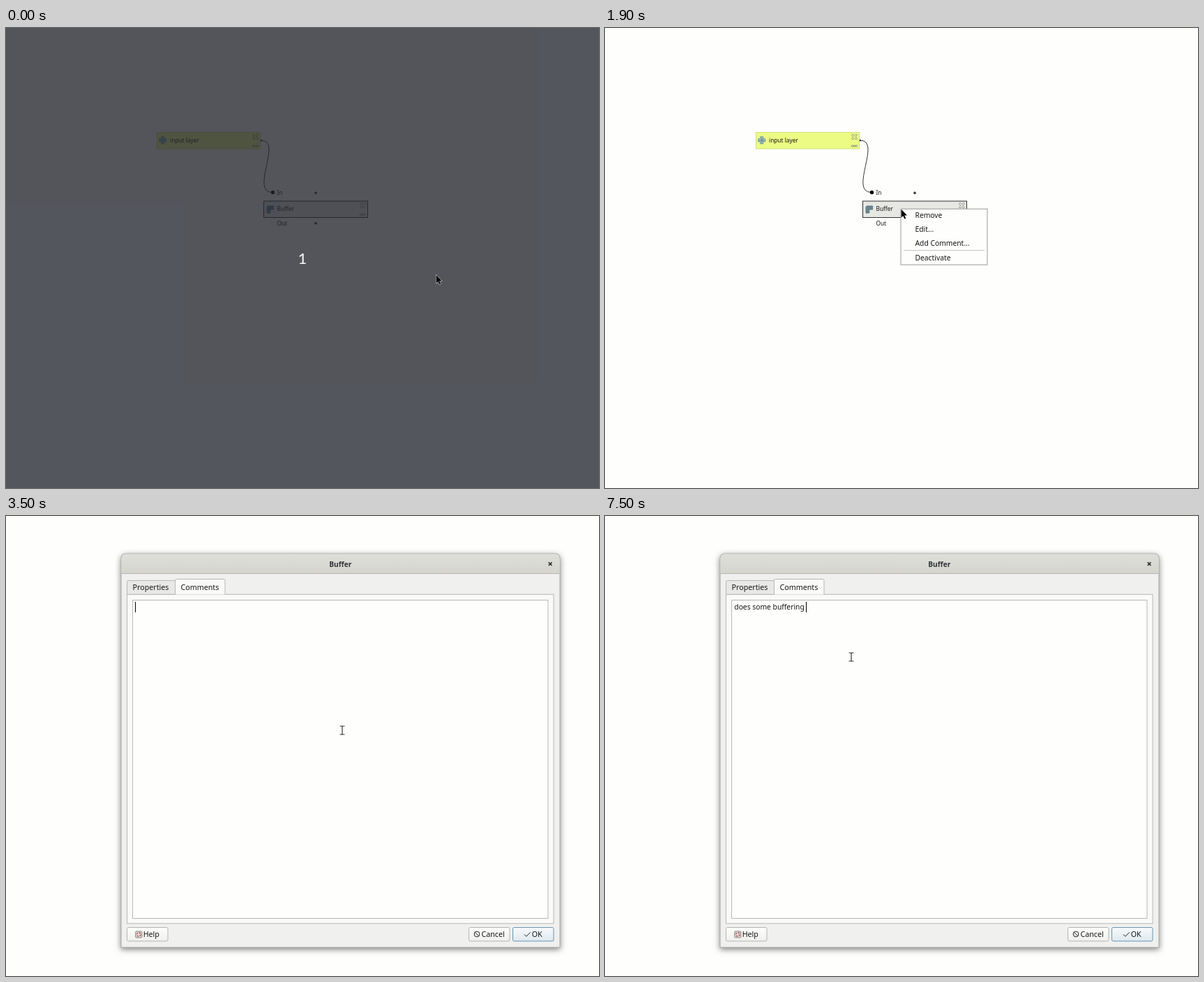
Recreate the animation shown at these times as an HTML page. Size 850x659 px, loop 8 s.

```html
<!DOCTYPE html>
<html lang="en">
<head>
<meta charset="utf-8">
<title>Adding a comment to a model step</title>
<style>
html, body { margin: 0; width: 100%; height: 100%; overflow: hidden; background: #fefefd; }
svg { display: block; width: 850px; height: 659px; }
text { font-family: "Noto Sans", sans-serif; font-size: 10.67px; fill: #161616; white-space: pre; }
.node text { font-size: 8.3px; }
#menu text { font-size: 10.3px; }
#menu text.on { fill: #fff; }
#typed { font-size: 10.3px; }
#count { font: 22px Lato, sans-serif; fill: #fff; text-anchor: middle; }
#title { font-size: 10.2px; font-weight: 700; fill: #303336; text-anchor: middle; }
#dialog { transform-origin: 479.5px 336px; }
.line { fill: none; stroke: #222; }
.edge { stroke: #b7b7b3; }
</style>
</head>
<body>
<svg viewBox="0 0 850 659">
  <defs>
    <linearGradient id="bar" x2="0" y2="1"><stop stop-color="#dfdfda"/><stop offset="1" stop-color="#d5d5ce"/></linearGradient>
    <linearGradient id="btn" x2="0" y2="1"><stop stop-color="#fdfdfc"/><stop offset="1" stop-color="#f0f0ef"/></linearGradient>
    <linearGradient id="btnOk" x2="0" y2="1"><stop stop-color="#f7fafb"/><stop offset="1" stop-color="#dfe9ee"/></linearGradient>
    <filter id="shadow" x="-5%" y="-5%" width="110%" height="110%">
      <feDropShadow dx="0" dy="2.5" stdDeviation="4" flood-opacity=".5"/>
    </filter>
    <g id="tools" fill="none" stroke="#8a8a80" stroke-width=".9">
      <path d="M-4-2.5-2.5-4 0-1.6 2.5-4 4-2.5 1.6 0 4 2.5 2.5 4 0 1.6-2.5 4-4 2.5-1.6 0Z"/>
      <circle cx="-3" cy="13" r="1.2"/><circle cy="13" r="1.2"/><circle cx="3" cy="13" r="1.2"/>
    </g>
    <path id="plus" d="M-2 0H2M0-2V2" stroke="#111" stroke-width="1.2"/>
  </defs>

  <g class="node">
    <path class="line" d="M366 161C397 161 349 235.500 382 235.500" stroke-width=".9"/>
    <circle cx="365.500" cy="161" r="1.200"/>
    <circle cx="382.500" cy="235.500" r="2.700"/>
    <rect x="216.500" y="149.500" width="148" height="23.500" fill="#ebfb83" stroke="#d3df78"/>
    <g transform="translate(224.700 160.800)" stroke="#587e8a" stroke-width=".9">
      <path d="M-1.900-5H1.900V-1.900H5V1.900H1.900V5H-1.900V1.900H-5V-1.900H-1.900Z" fill="#bdd7cd"/>
      <path d="M-3.500 0H3.500M0-3.500V3.500" stroke-width="1.200"/>
    </g>
    <text x="235" y="164">input layer</text>
    <use href="#tools" x="357.500" y="156"/>
    <rect x="369.500" y="248" width="149" height="23.500" fill="#e7e8e4" stroke="#333"/>
    <path d="M374 265V257Q374 255 376 255H383.500V260H378.800V265Z" fill="#6a8791" stroke="#53707c" stroke-width=".9"/>
    <text x="388.500" y="262.300">Buffer</text>
    <use href="#tools" x="511.300" y="254.300"/>
    <text x="388.500" y="239">In</text>
    <text x="388.500" y="283">Out</text>
    <use href="#plus" x="444" y="236.300"/>
    <use href="#plus" x="444" y="279.800"/>
  </g>

  <g id="cover">
    <rect width="850" height="659" fill="#23262e" fill-opacity=".78"/>
    <text id="count" x="425" y="338">1</text>
  </g>

  <g id="menu">
    <rect x="424" y="259.200" width="124" height="80" fill="#fefefd" stroke="#999"/>
    <path d="M428 318.500H544" stroke="#c4c4c0"/>
    <rect id="hover" x="424.500" width="123" height="19" fill="#3891c3" stroke="#2b7ba8"/>
    <text x="444.500" y="272.400">Remove</text>
    <text x="444.500" y="292.300">Edit...</text>
    <text x="444.500" y="312.200">Add Comment...</text>
    <text x="444.500" y="333.200">Deactivate</text>
  </g>

  <g id="dialog">
    <path d="M165 618V61Q165 54 172 54H787Q794 54 794 61V618Z" fill="#f0f0ef" stroke="#8f8f8b" stroke-width=".8" filter="url(#shadow)"/>
    <path d="M165.500 82V61Q165.500 54.500 172 54.500H787Q793.500 54.500 793.500 61V82Z" fill="url(#bar)"/>
    <path class="edge" d="M165.500 82.500H793.500"/>
    <text id="title" x="479.300" y="72.700">Buffer</text>
    <path class="line" d="M777.700 66.200 782.500 71M782.500 66.200 777.700 71" stroke-width="1.500"/>
    <rect class="edge" x="173.500" y="112.300" width="611.500" height="471.500" fill="#fafaf9"/>
    <path class="edge" d="M173.500 112.300V94.500Q173.500 92.500 175.500 92.500H242.500V112.300Z" fill="#e8e8e6"/>
    <path class="edge" d="M242.500 112.500V92.500Q242.500 90.500 244.500 90.500H312Q314 90.500 314 92.500V112.500" fill="#fafaf9"/>
    <text x="181.600" y="106.300">Properties</text>
    <text x="250.600" y="105.800">Comments</text>
    <rect class="edge" x="181.500" y="120.500" width="595.500" height="456" fill="#fefefd"/>
    <g fill="url(#btn)" stroke="#b4b4b0">
      <rect x="173.500" y="589.500" width="58.500" height="19.500" rx="2"/>
      <rect x="663.500" y="589.500" width="58.500" height="19.500" rx="2"/>
      <rect x="726.500" y="589.500" width="58.500" height="19.500" rx="2" fill="url(#btnOk)" stroke="#6795b3"/>
    </g>
    <g transform="translate(190.300 599.500)">
      <rect x="-4.500" y="-4.500" width="9" height="9" rx="1" fill="#e8e2df" stroke="#75706e" stroke-width=".9"/>
      <circle r="2.600" fill="none" stroke="#a45b55" stroke-width="1.700" stroke-dasharray="2.500 1.600"/>
    </g>
    <text x="196.700" y="603">Help</text>
    <g class="line"><circle cx="675" cy="599" r="3.900"/><path d="M672.300 596.300 677.700 601.700"/></g>
    <text x="681.500" y="603">Cancel</text>
    <path class="line" d="M743 599.500 745.800 602.300 751.800 596.300"/>
    <text x="753.800" y="603">OK</text>
    <text id="typed" x="185.300" y="134.200"></text>
    <rect id="caret" y="123" width="1" height="15"/>
  </g>

  <g id="pointer">
    <path id="arrow" d="M.5.500V12.800L3.300 10.300 5.400 14.600 7.300 13.700 5.300 9.500H9Z" fill="#080808" stroke="#fff" stroke-width="1" paint-order="stroke"/>
    <g id="beam" fill="none">
      <path id="beamShape" d="M-3.500-6H-1Q0-6 0-5Q0-6 1-6H3.500M0-5V5M-3.500 6H-1Q0 6 0 5Q0 6 1 6H3.500" stroke="#333" stroke-width="1.200"/>
    </g>
  </g>
</svg>
<script>
const LOOP = 8000, TICK = 100;
const $ = id => document.getElementById(id);
const show = (id, on) => $(id).setAttribute("visibility", on ? "visible" : "hidden");

// pointer path: time, x, y
const path = [
  [500, 616, 353], [900, 463, 289], [1000, 463, 289], [1300, 424, 259],
  [2200, 424, 259], [2300, 430, 262], [2400, 430, 262], [2600, 447, 273],
  [2800, 475, 302], [2900, 475, 302], [3000, 482, 305], [3400, 482, 305],
  [3500, 482, 307], [3700, 482, 307], [4000, 347, 184], [4100, 347, 184],
  [4200, 353, 202]
];

// time, highlighted menu row
const rows = [[0, -1], [2300, 0], [2600, 1], [2800, 2]];

// time, number of letters typed
const note = "does some buffering ";
const keys = [
  [0, 0], [5300, 1], [5600, 2], [5700, 4], [5800, 5], [6000, 6], [6100, 8],
  [6200, 9], [6500, 10], [6600, 11], [6700, 12], [6900, 13], [7000, 14],
  [7100, 15], [7300, 16], [7400, 18], [7500, 20]
];

const latest = (track, t) => track.filter(k => k[0] <= t).pop()[1];

function pointAt(t) {
  const i = path.findIndex(p => p[0] > t);
  if (i < 0) return path[path.length - 1].slice(1);
  if (i === 0) return path[0].slice(1);
  const a = path[i - 1], b = path[i], k = (t - a[0]) / (b[0] - a[0]);
  return [1, 2].map(n => Math.round(a[n] + (b[n] - a[n]) * k));
}

const labels = document.querySelectorAll("#menu text");

function draw(t) {
  show("cover", t < 100);

  const row = latest(rows, t), menuOpen = t >= 1900 && t < 3300;
  show("menu", menuOpen);
  show("hover", menuOpen && row >= 0);
  $("hover").setAttribute("y", 279.2 + (row - 1) * 19.9);
  labels.forEach((el, i) => el.classList.toggle("on", i === row));

  const open = t >= 3300, opening = t < 3400;
  show("dialog", open);
  $("dialog").style.opacity = opening ? 0.5 : 1;
  $("dialog").style.transform = opening ? "scaleY(.75)" : "none";

  $("typed").textContent = note.slice(0, latest(keys, t));
  const width = $("typed").textContent ? $("typed").getComputedTextLength() : 0;
  $("caret").setAttribute("x", Math.round(185 + width));
  show("caret", t >= 3500 && (t < 3900 || t >= 4400));

  $("pointer").setAttribute("transform", `translate(${pointAt(t)})`);
  show("arrow", t < 3500);
  show("beam", t >= 3500);
}

const start = performance.now();
function tick() {
  const t = (performance.now() - start) % LOOP;
  draw(Math.floor(t / TICK) * TICK);
  requestAnimationFrame(tick);
}
tick();
</script>
</body>
</html>
```
